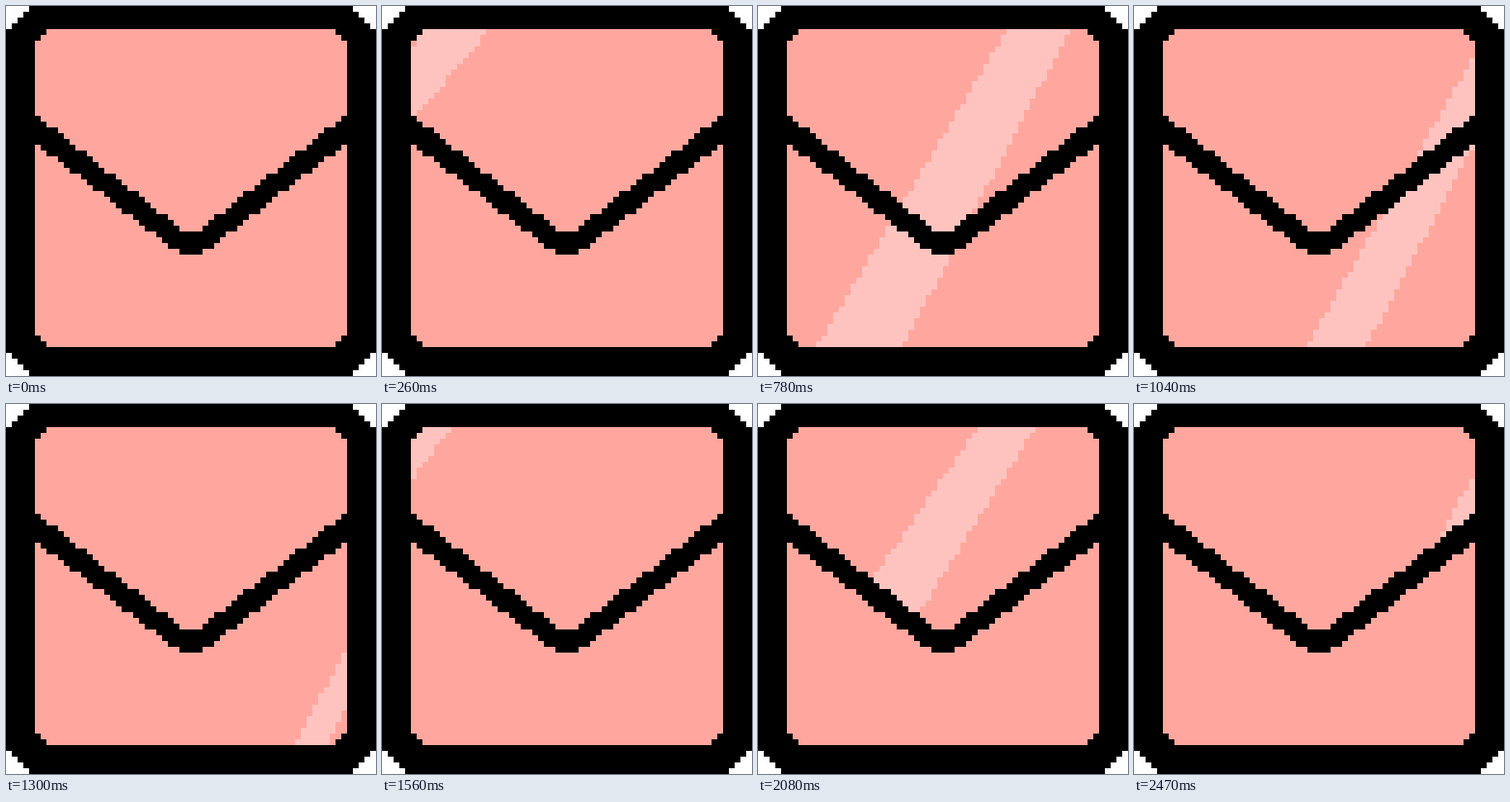
An HTML page with a canvas that plays this animation: 384 by 384 pixels, repeating every 2600 ms.

```html
<!DOCTYPE html>
<html>
<head>
<meta charset="utf-8">
<title>Envelope</title>
<style>
  html, body { margin: 0; height: 100%; overflow: hidden; background: #fff; }
  canvas { display: block; width: 100vw; height: 100vh; image-rendering: pixelated; }
</style>
</head>
<body>
<canvas width="64" height="64"></canvas>
<script>
const ctx = document.querySelector('canvas').getContext('2d');
const STEP = 130, STEPS = 20;
const INK = '#000', PAPER = '#ffa79e', SHINE = '#ffc3bf';
const TOP = 4, BOTTOM = 59, LEFT = 5, RIGHT = 59;

// Keys: step, then left edge x at top and bottom, right edge x at top and bottom
const wholeSweep = [[4, 25.4, -15.3, 36.4, -2.1], [6, 43, 10, 54, 25], [10, 79.8, 49.8, 85, 55.25]];
const flapSweep = [[14, 20, -24.7, 30, -7.5], [16, 38, 0, 48, 13.7], [19, 63.3, 33.3, 75, 48]];

function edgesAt(keys, step) {
  const i = step < keys[1][0] ? 0 : 1;
  const a = keys[i], b = keys[i + 1];
  const p = (step - a[0]) / (b[0] - a[0]);
  return a.slice(1).map((v, j) => v + (b[j + 1] - v) * p);
}

// Rows covered by the flap line in a column
function flapRows(x) {
  const d = Math.min(x, 63 - x) - LEFT;
  return d > 24 ? [39, 43] : [Math.floor(19.65 + 0.78 * d), Math.floor(24.5 + 0.768 * d)];
}

function isInside(x, y) {
  const dx = Math.min(x - LEFT, RIGHT - 1 - x);
  const dy = Math.min(y - TOP, BOTTOM - 1 - y);
  return dx >= 0 && dy >= 0 && dx + dy >= 2;
}

function colorAt(x, y, step, edges) {
  if (Math.min(x, 63 - x) + Math.min(y, 63 - y) < 4) return '#fff';
  if (!isInside(x, y)) return INK;
  const [from, to] = flapRows(x);
  if (y >= from && y < to) return INK;
  if (step > 10 && y >= to) return PAPER;
  const p = (y + 0.5 - TOP) / (BOTTOM - TOP);
  const [lt, lb, rt, rb] = edges;
  const cx = x + 0.5;
  return cx > lt + (lb - lt) * p && cx < rt + (rb - rt) * p ? SHINE : PAPER;
}

function draw(step) {
  const edges = edgesAt(step > 10 ? flapSweep : wholeSweep, step);
  for (let y = 0; y < 64; y++) {
    for (let x = 0; x < 64; x++) {
      ctx.fillStyle = colorAt(x, y, step, edges);
      ctx.fillRect(x, y, 1, 1);
    }
  }
}

let last = -1;
function tick() {
  const step = Math.floor(performance.now() / STEP) % STEPS;
  if (step !== last) draw(last = step);
  requestAnimationFrame(tick);
}
tick();
</script>
</body>
</html>
```
